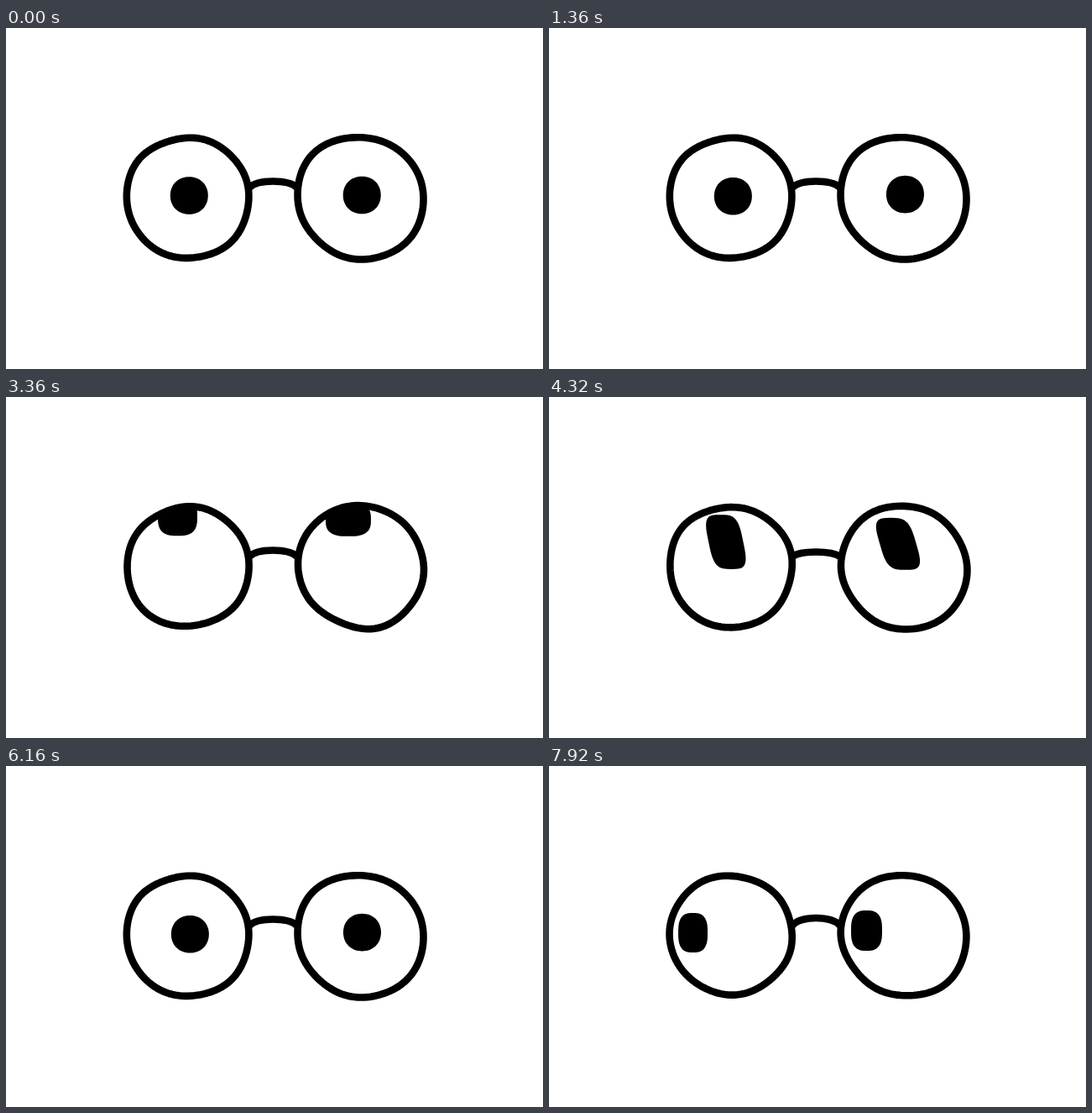
An HTML page with a canvas that plays this animation: 640x406 px, repeating every 8 s.

```html
<!DOCTYPE html>
<html lang="en">
<head>
<meta charset="utf-8">
<title>Glasses</title>
<style>
html, body { margin: 0; width: 100%; height: 100%; overflow: hidden; background: #fff; }
canvas { display: block; }
</style>
</head>
<body>
<canvas id="stage" width="640" height="406"></canvas>
<script>
const ctx = document.getElementById('stage').getContext('2d');
const STEP = 80, COUNT = 100, TAU = Math.PI * 2;

// Lens ellipses; `lean` stretches them along the falling diagonal.
const LENSES = [
  { x: 217, y: 202.3, rx: 72.8, ry: 71.6, lean: 0 },
  { x: 423, y: 202, rx: 74.8, ry: 72.9, lean: 1.4 }
];

// Four drawings of the glasses: vertical shift, extra height,
// direction of each lens's corner in degrees, top of the bridge.
const DRAWINGS = {
  A: { dy: .4, grow: 0, corners: [222, 207], top: 182.5 },
  B: { dy: -.4, grow: -.6, corners: [130, 70], top: 182.5 },
  C: { dy: .5, grow: .2, corners: [220, 60], top: 184.5 },
  D: { dy: -.8, grow: -1.3, corners: [235, 60], top: 181 }
};
const BOIL = 'ACBDCA';

const rand = seed => {
  const v = Math.sin(seed * 127.1) * 43758.5;
  return v - Math.floor(v);
};

function polar(x, y, point, steps) {
  const path = new Path2D();
  for (let i = 0; i < steps; i++) {
    const [dx, dy] = point(i / steps * TAU);
    path.lineTo(x + dx, y + dy);
  }
  path.closePath();
  return path;
}

function lensPath(lens, drawing, corner, seed) {
  const dir = corner * TAU / 360;
  return polar(lens.x, lens.y + drawing.dy, a => {
    let bump = lens.lean * Math.sin(2 * a) + 2 * Math.exp(8 * (Math.cos(a - dir) - 1));
    for (let k = 3; k < 7; k++) bump += .3 * Math.sin(k * a + TAU * rand(seed + k));
    return [(lens.rx + bump) * Math.cos(a), (lens.ry + drawing.grow + bump) * Math.sin(a)];
  }, 120);
}

function bridgePath(top) {
  const pull = (top - 190 / 4) * 4 / 3;
  const path = new Path2D();
  path.moveTo(290, 190);
  path.bezierCurveTo(300, pull, 336, pull, 347, 190);
  return path;
}

Object.values(DRAWINGS).forEach((d, n) => {
  d.lenses = LENSES.map((lens, i) => lensPath(lens, d, d.corners[i], n * 20 + i * 10));
  d.bridge = bridgePath(d.top);
});

// A pose holds both pupils; `square` is the superellipse exponent.
const eye = (x, y, rx, ry) => ({ x, y, rx, ry, shear: 0 });
const pose = (left, right, square, shift = 0) => ({ eyes: [left, right], square, shift });

const CENTER = pose(eye(217.5, 200, 22.5, 22.3), eye(424.7, 199, 22.5, 22.3), 2.1);
const UP = pose(eye(204.8, 140.5, 23.5, 23), eye(407.7, 145, 27, 20), 2.9, 2);
const LEFT = pose(eye(170.8, 196, 17.5, 23.5), eye(378, 196, 18.5, 24), 2.8);

// One in-between: halfway, stretched and slanted along the move.
function smear(from, to, shift) {
  const eyes = from.eyes.map((a, i) => {
    const b = to.eyes[i], dx = b.x - a.x, dy = b.y - a.y;
    return {
      x: a.x + dx / 2, y: a.y + dy / 2 + 2,
      rx: 17.5 + Math.abs(dx) / 4, ry: 17.5 + Math.abs(dy) / 4,
      shear: dx * dy / (dx * dx + dy * dy)
    };
  });
  return { eyes, square: 3.6, shift };
}

const TIMELINE = [
  [0, CENTER], [33, smear(CENTER, UP, 1)], [34, UP],
  [54, smear(UP, CENTER, 1)], [55, CENTER],
  [95, smear(CENTER, LEFT, 0)], [96, LEFT]
];

function pupil(p, [dx, dy], square) {
  const bend = v => Math.sign(v) * Math.abs(v) ** (2 / square);
  return polar(p.x + dx, p.y + dy, a => {
    const y = p.ry * bend(Math.sin(a));
    return [p.rx * bend(Math.cos(a)) + p.shear * y, y];
  }, 72);
}

function draw(n) {
  const now = TIMELINE.filter(([start]) => start <= n).pop()[1];
  const phase = (n + now.shift) % BOIL.length;
  const glasses = DRAWINGS[BOIL[phase]];
  const a = phase / BOIL.length * TAU, sin = Math.sin(a), cos = Math.cos(a);
  const wobble = [[.75 - 1.25 * sin, 1 - 1.5 * cos], [-.5 * cos, sin]];

  ctx.fillStyle = '#fff';
  ctx.fillRect(0, 0, 640, 406);
  ctx.fillStyle = ctx.strokeStyle = '#000';
  ctx.lineWidth = 8.6;
  ctx.lineCap = ctx.lineJoin = 'round';
  glasses.lenses.forEach((lens, i) => {
    ctx.save();
    ctx.clip(lens);
    ctx.fill(pupil(now.eyes[i], wobble[i], now.square));
    ctx.restore();
    ctx.stroke(lens);
  });
  ctx.stroke(glasses.bridge);
}

const began = performance.now();
function tick() {
  draw(Math.floor(Math.max(0, performance.now() - began) / STEP) % COUNT);
  requestAnimationFrame(tick);
}
tick();
</script>
</body>
</html>
```
